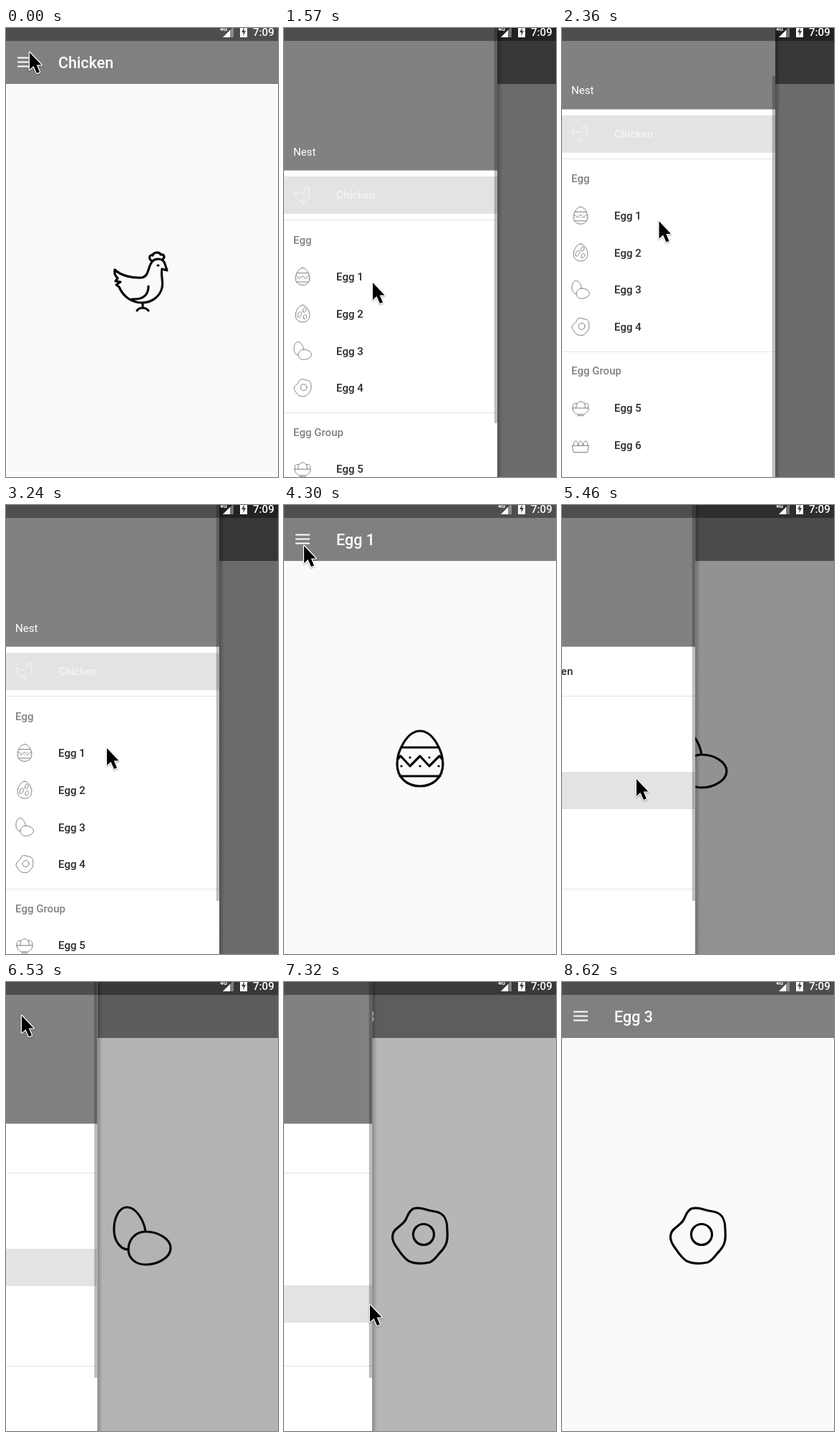
Animation of 380x626 px, one loop 8810 ms. Source, as an HTML page with a canvas:

```html
<!DOCTYPE html>
<html lang="en">
<head>
<meta charset="utf-8">
<title>Nest drawer</title>
<style>
html, body { margin: 0; width: 100%; height: 100%; overflow: hidden; background: #fafafa; }
canvas { display: block; }
</style>
</head>
<body>
<canvas id="stage" width="380" height="626"></canvas>
<script>
const ctx = document.getElementById('stage').getContext('2d');
const W = 380, H = 626, LOOP = 8810, TICK = LOOP / 100, DRAWER = 298, ROW = 51.7;
const FONT = 'Roboto, "Open Sans", sans-serif';

// Icons live in an 80 x 80 box centred on 0,0.
const EGG = 'M0-38C18-38 32-10 32 8C32 28 17 39 0 39C-17 39-32 28-32 8C-32-10-18-38 0-38Z';
const icons = {
  chicken: 'M-38-16C-30-8-14-4 0-5C10-7 8-20 14-27C19-33 30-32 32-24L35-15L28-17C26-8 30 0 28 9' +
    'C25 22 13 30 0 30C-14 30-26 22-32 8L-36 5L-30 1L-37 0L-34-4C-38-8-39-12-38-16Z' +
    'M14-28C8-32 11-38 15-36C16-41 25-41 26-37C31-38 33-33 28-30' +
    'M9 7C9 17 4 26-14 25M1 30V37M-7 41C-4 36 5 36 9 41M22-22h1',
  painted: EGG + 'M-25-15H25M-28 25H28M-31 1L-27-3L-14 11L0-3L13 11L27-3L31 1' +
    'M-14-1h.1M13-1h.1M-26 11h.1M0 11h.1M26 11h.1',
  spotted: EGG + 'M2-8C-2-20 10-32 15-22C20-14 8 2 2-8ZM-22 14C-26 2-12-14-6-4C-2 6-16 26-22 14Z' +
    'M4 22C0 12 12-2 18 8C22 16 10 32 4 22Z',
  pair: 'M5-5C2-24-10-39-21-39C-33-39-40-22-39-5C-38 10-29 20-19 20' +
    'M5-5C22-5 40 5 40 18C40 31 22 41 5 41C-8 41-19 33-19 20C-19 6-9-5 5-5Z',
  fried: 'M-12-35C-8-39-1-38 4-37C10-35 15-34 21-33C34-31 38-22 38-8C39 6 38 13 30 22C24 28 20 36 13 38' +
    'C4 40-7 40-16 36C-24 31-29 22-34 15C-38 9-39 3-38-1C-37-9-27-12-21-20C-18-24-17-31-12-35Z' +
    'M19.500-1a14.500 14.500 0 1 1-29 0a14.500 14.500 0 1 1 29 0Z',
  bowl: 'M-36 2H36C36 18 22 28 14 30H-14C-22 28-36 18-36 2ZM-14 36H14' +
    'M-20 2C-26-38 26-38 20 2M-34 2C-40-16-26-24-16-18M34 2C40-16 26-24 16-18',
  carton: 'M-37 4H37L31 34H-31ZM-32 4C-32-24-12-24-12 4M-10 4C-10-24 10-24 10 4M12 4C12-24 32-24 32 4'
};
for (const name in icons) icons[name] = new Path2D(icons[name]);

const eggY = n => 346.8 + ROW * (n - 1) + (n > 4 ? 61.4 : 0);
const items = [['Chicken', 'chicken', 233],
  ...['painted', 'spotted', 'pair', 'fried', 'bowl', 'carton'].map((name, i) => [`Egg ${i + 1}`, name, eggY(i + 1)])];
const pageIcons = ['chicken', 'painted', 'pair', 'fried'];

// Ticks at which the drawer starts to open, close, open, ...
const taps = [8.4, 38.5, 50.4, 61.49, 73.4, 82.08];
// Pointer moves: first tick, last tick, x, y reached.
const moves = [[0, 3, 29, 43], [9, 16, 124, 354], [18, 28, 136, 266], [29, 37, 141, 338], [41, 49, 28, 56],
  [52, 60, 104, 381], [64, 72, 22, 46], [75, 81, 120, 449], [96, 97, 286, 490]];

const clamp = u => Math.max(0, Math.min(1, u));
const smooth = u => u * u * (3 - 2 * u);

function pointerAt(k) {
  let x = 33, y = 33;
  for (const [from, to, toX, toY] of moves) {
    const u = smooth(clamp((k - from) / (to - from)));
    x += (toX - x) * u;
    y += (toY - y) * u;
  }
  return [x, y];
}

function drawerAt(k) {
  const count = taps.filter(t => t <= k).length;
  if (!count) return 0;
  const rest = (1 - clamp((k - taps[count - 1]) * TICK / 500)) ** 5;
  return count % 2 ? 1 - rest : rest;
}

// The list is dragged up, then back almost to its top.
function scrollAt(k) {
  const u = clamp((k - 18) / 19);
  return 85 * Math.sin(Math.PI * u) + u;
}

function box(x, y, w, h, fill) {
  ctx.fillStyle = fill;
  ctx.fillRect(x, y, w, h);
}

function text(str, x, y, size, weight, fill) {
  ctx.font = `${weight} ${size}px ${FONT}`;
  ctx.fillStyle = fill;
  ctx.fillText(str, x, y);
}

function shape(d, fill) {
  ctx.fillStyle = fill;
  ctx.fill(new Path2D(d));
}

function icon(name, x, y, scale, color) {
  ctx.save();
  ctx.translate(x, y);
  ctx.scale(scale, scale);
  ctx.lineWidth = 3.2;
  ctx.lineCap = ctx.lineJoin = 'round';
  ctx.strokeStyle = color;
  ctx.stroke(icons[name]);
  ctx.restore();
}

function drawPage(page) {
  box(0, 0, W, H, '#fafafa');
  box(0, 0, W, 78, '#808080');
  box(0, 0, W, 18, '#4e4e4e');
  for (let i = 0; i < 3; i++) box(16, 40.5 + 6 * i, 20, 2, '#fff');
  text(items[page][0], 73, 56, 21.5, 500, '#fff');
  icon(pageIcons[page], 190, 353, 1, '#080808');
}

function drawDrawer(open, scroll, page) {
  box(0, 0, W, H, `rgba(0,0,0,${Math.min(0.57, 0.665 * open)})`);
  ctx.save();
  ctx.translate(DRAWER * (open - 1), 0);
  const shadow = ctx.createLinearGradient(DRAWER, 0, DRAWER + 7, 0);
  shadow.addColorStop(0, 'rgba(0,0,0,.25)');
  shadow.addColorStop(1, 'rgba(0,0,0,0)');
  box(DRAWER, 0, 7, H, shadow);
  box(0, 0, DRAWER, H, '#fff');

  ctx.save();
  ctx.translate(0, -scroll);
  box(0, 0, DRAWER, 198.6, '#818181');
  text('Nest', 13, 177.5, 15.1, 400, '#fff');
  for (const y of [267, 536]) box(0, y, DRAWER, 1, '#e2e2e2');
  text('Egg', 13, 300.5, 15.1, 500, '#828282');
  text('Egg Group', 13, 568.5, 15.1, 500, '#828282');
  items.forEach(([label, name, y], i) => {
    const on = i === page;
    if (on) box(0, Math.round(y - 26), DRAWER, 52, '#e3e3e3');
    icon(name, 26, y - 0.5, 0.31, on ? '#f6f6f6' : '#7c7c7c');
    text(label, 73, y + 5.4, 15.1, 500, on ? '#f4f4f4' : '#2a2a2a');
  });
  ctx.restore();

  box(DRAWER - 4.3, scroll * 0.88 - 8, 4.3, 559, 'rgba(0,0,0,.25)');
  box(0, 0, DRAWER, 18, 'rgba(0,0,0,.4)');
  ctx.restore();
}

function drawStatus() {
  shape('M303 13H318V-2Z', 'rgba(255,255,255,.35)');
  shape('M303 13H313V3Z', '#fff');
  text('4G', 299, 4, 8, 700, '#fff');
  box(327, -2, 10, 15, '#fff');
  shape('M333-1L329 6H331.500V11L335 4H332.500Z', '#444');
  text('7:09', 345, 11, 15.1, 500, '#fff');
}

const ARROW = new Path2D('M0 0V24L5.500 19L10 29L14 27.500L9.800 17.500H16.500Z');
function drawPointer(x, y) {
  ctx.save();
  ctx.translate(x, y + 1);
  ctx.lineJoin = 'round';
  ctx.lineWidth = 2.6;
  ctx.strokeStyle = '#fff';
  ctx.shadowColor = 'rgba(0,0,0,.35)';
  ctx.shadowBlur = 2;
  ctx.shadowOffsetY = 1;
  ctx.stroke(ARROW);
  ctx.shadowColor = 'transparent';
  ctx.fillStyle = '#000';
  ctx.fill(ARROW);
  ctx.restore();
}

// The screen refreshes once per tick.
function draw(ms) {
  const k = Math.floor(ms / TICK + 0.25);
  const page = taps.filter((t, i) => i % 2 && t <= k).length;
  const open = drawerAt(k);
  drawPage(page);
  if (open > 0.003) drawDrawer(open, scrollAt(k), page);
  drawStatus();
  if (k < 98) drawPointer(...pointerAt(k));
}

const start = performance.now();
function tick() {
  draw((performance.now() - start) % LOOP);
  requestAnimationFrame(tick);
}
tick();
</script>
</body>
</html>
```
